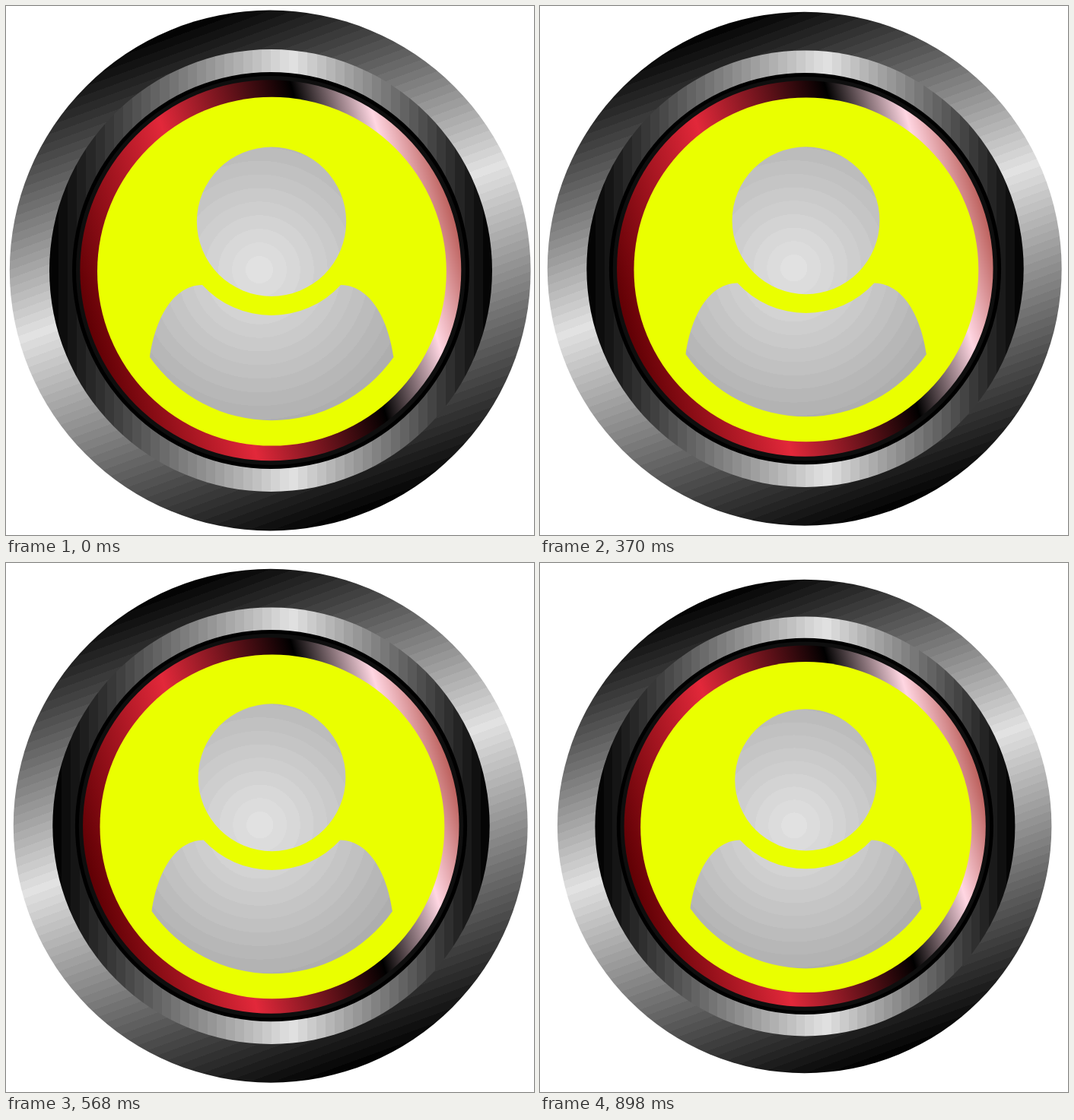
Write an HTML page with a canvas that moves like this. It is 694 by 696 pixels and loops after 1030 ms.

```html
<!DOCTYPE html>
<html lang="en">
<head>
<meta charset="utf-8">
<title>Pulsing user button</title>
<style>
  html, body { margin: 0; width: 100%; height: 100%; overflow: hidden; background: #fff; }
  canvas { display: block; }
</style>
</head>
<body>
<canvas id="stage" width="694" height="696"></canvas>
<script>
const ctx = document.getElementById('stage').getContext('2d');
const CENTER = 348;
const LOOP = 1030;
const POSES = [
  { until: 370, scale: 1, x: 348, y: 348 },
  { until: 700, scale: 0.987, x: 348.5, y: 345.7 },
  { until: LOOP, scale: 0.9485, x: 348.4, y: 346.4 }
];

// Gradient axis through the centre, reaching the radius on both sides.
function axis(degrees, radius) {
  const dx = radius * Math.cos(degrees * Math.PI / 180);
  const dy = radius * Math.sin(degrees * Math.PI / 180);
  return ctx.createLinearGradient(CENTER - dx, CENTER - dy, CENTER + dx, CENTER + dy);
}

// Fills a gradient with flat grey steps; shade maps 0..1 to a grey level.
function stepped(gradient, steps, shade) {
  for (let i = 0; i < steps; i++) {
    const level = shade((i + 0.5) / steps);
    const color = `rgb(${level}, ${level}, ${level})`;
    gradient.addColorStop(i / steps, color);
    gradient.addColorStop((i + 1) / steps, color);
  }
  return gradient;
}

// Polished metal: black at both ends, brightest at the peak.
function metal(degrees, radius, steps, peak) {
  return stepped(axis(degrees, radius), steps,
    t => 226 * (t < peak ? t / peak : (1 - t) / (1 - peak)));
}

const casing = metal(70, 343, 64, 0.46);
const bezel = metal(0, 291, 48, 0.548);
const silver = stepped(ctx.createRadialGradient(333, 347, 0, 333, 347, 215), 12,
  t => 227 - 55 * t);

const redRing = axis(-16, 251);
redRing.addColorStop(0, '#600004');
redRing.addColorStop(0.33, '#e2283a');
redRing.addColorStop(0.685, '#000');
redRing.addColorStop(0.87, '#ffd6e2');
redRing.addColorStop(1, '#bc605c');

const shoulders = new Path2D(`M258 367 A123.5 123.5 0 0 0 440 367
  C484 368 504 422 509.5 462 A196 196 0 0 1 189 462
  C194.5 422 214 368 258 367 Z`);

function disc(x, y, r, fill) {
  ctx.beginPath();
  ctx.arc(x, y, r, 0, Math.PI * 2);
  ctx.fillStyle = fill;
  ctx.fill();
}

function draw(time) {
  const pose = POSES.find(p => time < p.until);
  ctx.setTransform(1, 0, 0, 1, 0, 0);
  ctx.clearRect(0, 0, 694, 696);
  ctx.translate(pose.x, pose.y);
  ctx.scale(pose.scale, pose.scale);
  ctx.translate(-CENTER, -CENTER);

  disc(347.2, 348, 342.4, casing);
  disc(348, 348, 291, bezel);
  disc(348, 348, 261, '#000');
  disc(348, 348, 256, '#0e0e0e');
  disc(347.8, 347.8, 250.5, redRing);
  disc(349.4, 349.2, 229.4, '#eaff00');
  disc(349, 283.7, 98.2, silver);
  ctx.fillStyle = silver;
  ctx.fill(shoulders);
}

function tick() {
  draw(performance.now() % LOOP);
  requestAnimationFrame(tick);
}
tick();
</script>
</body>
</html>
```
